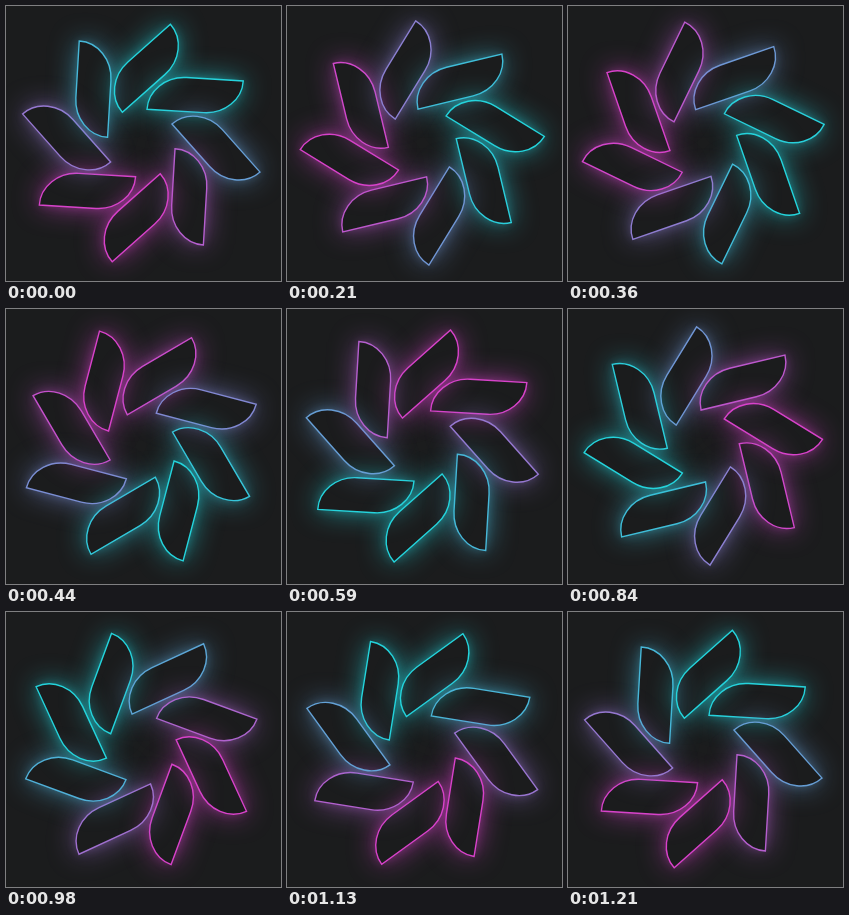
An HTML page with a canvas that plays this animation: 275x275 px, repeating every 1.29 s.

```html
<!DOCTYPE html>
<html lang="en">
<head>
<meta charset="utf-8">
<title>Neon pinwheel</title>
<style>
  html, body { margin: 0; height: 100%; overflow: hidden; background: #1b1c1d; }
  canvas { display: block; width: 100vw; height: 100vh; }
</style>
</head>
<body>
<canvas id="stage" width="275" height="275"></canvas>
<script>
const ctx = document.getElementById('stage').getContext('2d');
const SIZE = 275, CX = 135.3, CY = 137, LOOP = 1290;
const CYAN = [36, 212, 220], MAGENTA = [216, 66, 202];
// Start time of each step; the last pose equals the first
const STARTS = [0, 70, 140, 210, 290, 370, 440, 520, 590, 670, 750, 840, 910, 980, 1060, 1130, 1210];

// Box with two opposite rounded corners
const shape = new Path2D('M-47.2 17 A37.6 34 0 0 1 -9.6 -17 H47.2 A37.6 34 0 0 1 9.6 17 Z');

function petal(i, turn) {
  const [x, y] = i % 2 ? [53.4, -52.5] : [50.9, -51];
  const path = new Path2D();
  path.addPath(shape, new DOMMatrix().translate(CX, CY).rotate(turn + i * 45).translate(x, y));
  return path;
}

// Cyan at 0 degrees, magenta at 180
function neon(angle) {
  const mix = 0.5 - 0.58 * Math.cos(angle * Math.PI / 180);
  const k = Math.min(1, Math.max(0, mix));
  return `rgb(${CYAN.map((c, n) => Math.round(c + (MAGENTA[n] - c) * k))})`;
}

// Blurred copy of the path, kept outside the path itself
function glow(path, blur, alpha) {
  ctx.filter = `blur(${blur}px)`;
  ctx.globalAlpha = alpha;
  ctx.fill(path);
}

function draw(step) {
  const turn = 3.4 - step * 90 / 16;
  const hue = 27 + step * 360 / 16;
  ctx.fillStyle = '#1b1c1d';
  ctx.fillRect(0, 0, SIZE, SIZE);
  ctx.lineWidth = 1.4;

  for (let i = 0; i < 8; i++) {
    const path = petal(i, turn);
    const outside = new Path2D(path);
    outside.rect(0, 0, SIZE, SIZE);
    ctx.fillStyle = ctx.strokeStyle = neon(turn + i * 45 + 55.3 - hue);

    ctx.save();
    ctx.clip(outside, 'evenodd');
    glow(path, 14, 0.62);
    glow(path, 5, 0.3);
    ctx.restore();
    ctx.stroke(path);
  }
}

const t0 = performance.now();
function tick() {
  const t = (performance.now() - t0) % LOOP;
  draw(STARTS.findLastIndex(s => s <= t));
  requestAnimationFrame(tick);
}
tick();
</script>
</body>
</html>
```
